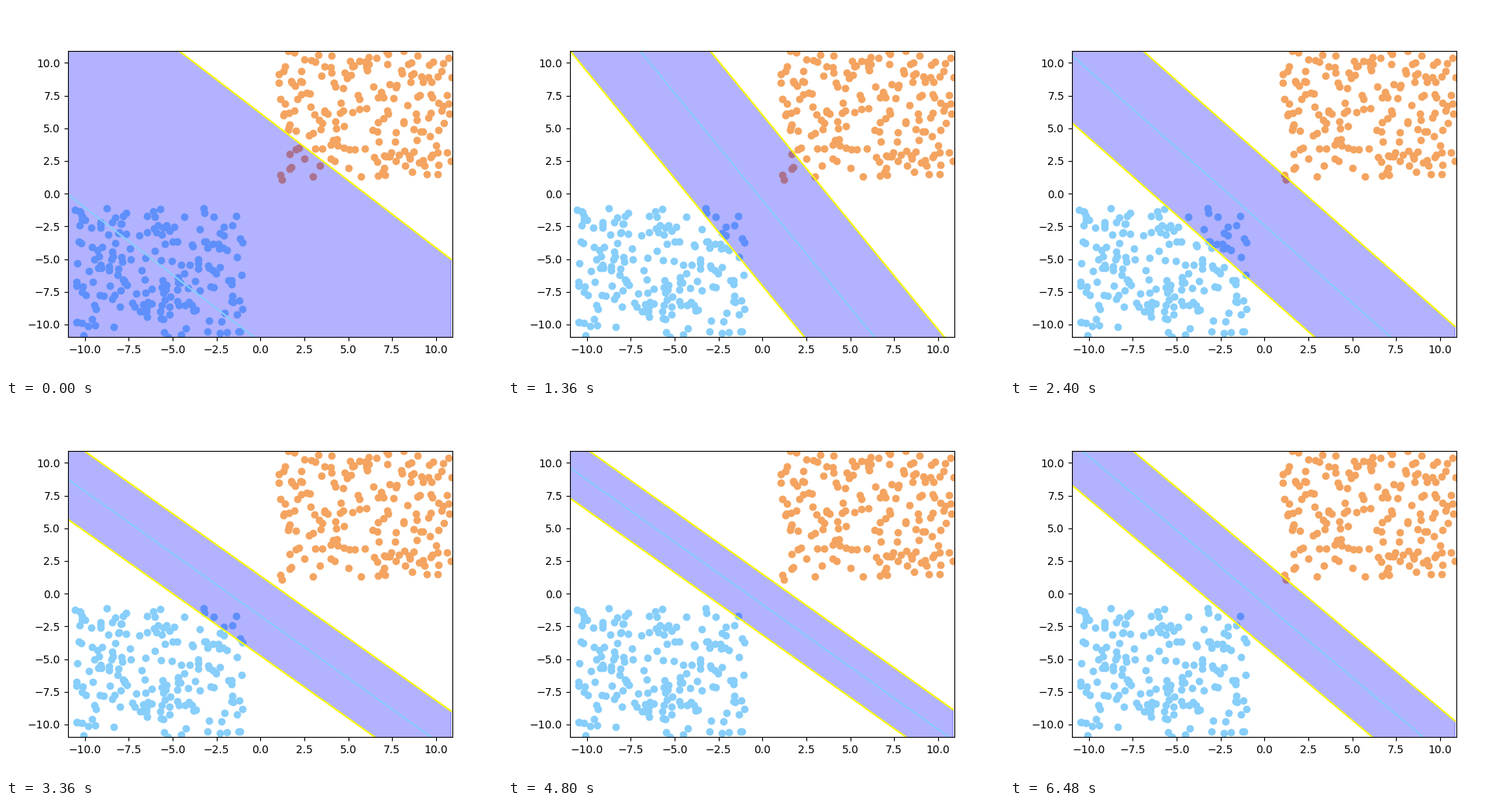
These frames come from a looping animation (640x480 px, 6560 ms). A matplotlib script:

```python
import numpy as np
import matplotlib.pyplot as plt
from matplotlib.animation import FuncAnimation

FRAMES, INTERVAL = 82, 80
LOW, HIGH = -10.965, 10.935
X = np.array([LOW, 10.86])

# Points facing the other class, as distances from the axes.
WARM = [(1.2, 1.1), (1.15, 1.45), (1.65, 1.9), (1.75, 2.05), (3, 1.3),
        (1.65, 3.05), (2, 3.4), (2.2, 3.5), (2.5, 2.7), (3.4, 2.15)]
COOL = [(1.4, 1.7), (1.6, 2.4), (1.05, 3.7), (1.15, 3.4), (2.1, 2.55),
        (2.1, 3.2), (2.65, 1.75), (3.2, 1.45), (3.25, 1.1), (2.3, 3.0)]

# Training updates the line during these runs of frames and rests between.
RUNS = [(1, 3), (5, 6), (14, 17), (20, 25), (27, 30), (33, 39),
        (41, 68), (71, 72), (75, 81)]

# frame, slope, intercept, vertical half width of the margin
KEYS = np.array([
    (0, -1.028, -11.35, 17.5),
    (3, -2.3, 7.0, 11.0),
    (6, -2.2, 4.8, 9.5),
    (17, -1.639, -0.51, 6.54),
    (30, -1.185, -2.43, 5.15),
    (42, -0.952, -1.70, 3.06),
    (51, -0.937, -0.63, 3.22),
    (60, -0.954, -0.83, 2.33),
    (81, -1.125, -0.78, 3.27),
])


def updates(frame):
    return sum(max(0, min(frame, b) - a + 1) for a, b in RUNS)


frames, slopes, mids, halves = KEYS.T
key_updates = [updates(f) for f in frames]
key_weights = slopes / halves, mids / halves, 1 / halves


def margin(frame):
    """Slope, intercept and half width, blended as classifier weights."""
    n = updates(frame)
    w1, b, w2 = (np.interp(n, key_updates, w) for w in key_weights)
    return w1 / w2, b / w2, 1 / w2


fig, ax = plt.subplots(figsize=(6.4, 4.8), dpi=100)
ax.set(xlim=(LOW, HIGH), ylim=(LOW, HIGH))
rng = np.random.default_rng(7)


def cloud(front, side, color):
    bulk = rng.uniform(1, HIGH, (200, 2))
    bulk = bulk[bulk.sum(axis=1) > 6]
    x, y = side * np.vstack([front, bulk]).T
    ax.scatter(x, y, color=color, zorder=1)


cloud(WARM, 1, "sandybrown")
cloud(COOL, -1, "lightskyblue")

band, = ax.fill([0, 1, 1, 0], [0, 0, 1, 1], color="blue", alpha=0.3,
                linewidth=1, zorder=1.5)
middle, = ax.plot([], [], color="lightskyblue")
upper, = ax.plot([], [], color="yellow")
lower, = ax.plot([], [], color="yellow")


def draw(frame):
    slope, mid, half = margin(frame)
    y = slope * X + mid
    middle.set_data(X, y)
    upper.set_data(X, y + half)
    lower.set_data(X, y - half)
    band.set_xy(np.column_stack([
        np.r_[X, X[::-1]], np.r_[y - half, (y + half)[::-1]]]))
    return band, middle, upper, lower


anim = FuncAnimation(fig, draw, frames=FRAMES, interval=INTERVAL,
                     init_func=lambda: draw(0), repeat=True, repeat_delay=0)
plt.show()
```
